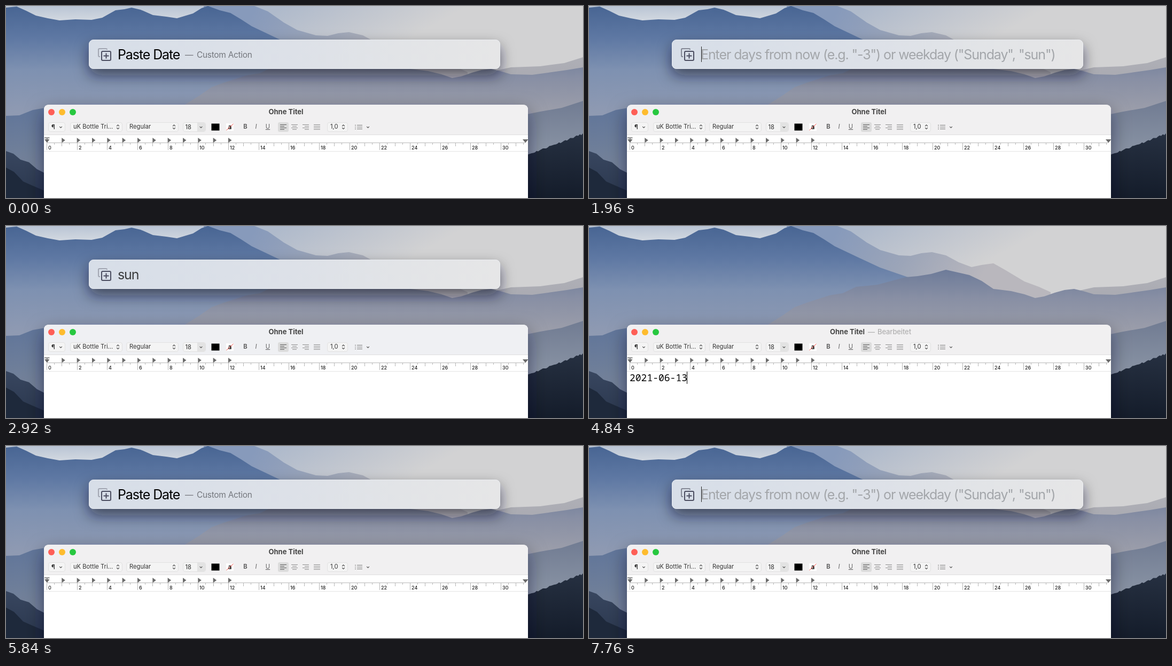
These frames come from a looping animation (1080 by 360 pixels, 8000 ms). An HTML page:

```html
<!DOCTYPE html>
<html lang="de">
<head>
<meta charset="utf-8">
<title>Paste Date</title>
<style>
  html, body { margin: 0; width: 100%; height: 100%; overflow: hidden; background: #8d99b3; }
  svg { display: block; width: 100%; height: 100%; }
  text { font-family: Inter, "Liberation Sans", sans-serif; font-optical-sizing: none; white-space: pre; }
  .big { font-size: 25px; font-weight: 400; letter-spacing: -.044em; }
  .sub { font-size: 15.5px; letter-spacing: -.02em; fill: #74777d; }
  .title { font-size: 13px; font-weight: 700; fill: #434343; }
  .soft { font-size: 13px; font-weight: 500; fill: #b0b0b0; letter-spacing: -.01em; }
  .tool { font-size: 11.2px; fill: #333; }
  .mark { font-size: 11.2px; fill: #606060; text-anchor: middle; }
  .num { font-size: 9px; font-weight: 500; fill: #222; }
  .mono { font: 500 18px "Noto Sans Mono", "DejaVu Sans Mono", monospace; }
  .box { fill: #f4f4f4; stroke: #e1e1e1; }
  .chev { fill: none; stroke: #555; stroke-width: 1.2; stroke-linecap: round; stroke-linejoin: round; }
  .key { fill: none; stroke: #fff; stroke-width: 5; stroke-linecap: round; stroke-linejoin: round; }
</style>
</head>
<body>
<svg viewBox="0 0 1080 360" preserveAspectRatio="none">
  <defs>
    <linearGradient id="sky" gradientUnits="userSpaceOnUse" x1="560" y1="-20" x2="640" y2="125">
      <stop offset="0" stop-color="#afbacb"/><stop offset=".5" stop-color="#c1c6cf"/><stop offset="1" stop-color="#d2d2d3"/>
    </linearGradient>
    <linearGradient id="glow" gradientUnits="userSpaceOnUse" x1="0" y1="0" x2="0" y2="28">
      <stop offset="0" stop-color="#b9c4d4"/><stop offset="1" stop-color="#d3d9e1"/>
    </linearGradient>
    <linearGradient id="far" gradientUnits="userSpaceOnUse" x1="470" y1="0" x2="700" y2="150">
      <stop offset="0" stop-color="#879abb"/><stop offset=".5" stop-color="#9ca5b8"/><stop offset="1" stop-color="#b9b7bd"/>
    </linearGradient>
    <linearGradient id="haze" gradientUnits="userSpaceOnUse" x1="0" y1="90" x2="0" y2="180">
      <stop offset="0" stop-color="#afb0b7"/><stop offset="1" stop-color="#a5a5ad"/>
    </linearGradient>
    <linearGradient id="main" gradientUnits="userSpaceOnUse" x1="0" y1="0" x2="0" y2="200">
      <stop offset="0" stop-color="#486593"/><stop offset=".3" stop-color="#5e78a3"/><stop offset=".6" stop-color="#7e91b1"/><stop offset="1" stop-color="#8f9ab2"/>
    </linearGradient>
    <linearGradient id="mid" gradientUnits="userSpaceOnUse" x1="0" y1="82" x2="0" y2="215">
      <stop offset="0" stop-color="#6d7b99"/><stop offset=".4" stop-color="#888fa4"/><stop offset="1" stop-color="#a1a2ac"/>
    </linearGradient>
    <linearGradient id="left" gradientUnits="userSpaceOnUse" x1="0" y1="190" x2="0" y2="300">
      <stop offset="0" stop-color="#60759a"/><stop offset="1" stop-color="#748299"/>
    </linearGradient>
    <linearGradient id="right" gradientUnits="userSpaceOnUse" x1="0" y1="175" x2="0" y2="270">
      <stop offset="0" stop-color="#707b92"/><stop offset="1" stop-color="#8892a3"/>
    </linearGradient>
    <linearGradient id="slope" gradientUnits="userSpaceOnUse" x1="0" y1="272" x2="0" y2="345">
      <stop offset="0" stop-color="#38465f"/><stop offset="1" stop-color="#2d3a51"/>
    </linearGradient>
    <linearGradient id="wood" gradientUnits="userSpaceOnUse" x1="0" y1="240" x2="0" y2="360">
      <stop offset="0" stop-color="#263041"/><stop offset="1" stop-color="#141c2a"/>
    </linearGradient>
    <linearGradient id="glass">
      <stop offset="0" stop-color="#d7dee8"/><stop offset=".5" stop-color="#dde1e8"/><stop offset=".75" stop-color="#e2e4e7"/><stop offset="1" stop-color="#e6e6e7"/>
    </linearGradient>
    <filter id="barShade" filterUnits="userSpaceOnUse" x="60" y="0" width="960" height="230">
      <feDropShadow dx="0" dy="12" stdDeviation="13" flood-color="#10162a" flood-opacity=".58"/>
    </filter>
    <filter id="winShade" filterUnits="userSpaceOnUse" x="0" y="100" width="1080" height="420">
      <feDropShadow dx="0" dy="13" stdDeviation="17" flood-color="#10162a" flood-opacity=".5"/>
    </filter>
    <filter id="keyShade" filterUnits="userSpaceOnUse" x="340" y="110" width="400" height="90">
      <feDropShadow dx="2" dy="3" stdDeviation="1.5" flood-color="#1c2238" flood-opacity=".55"/>
    </filter>
  </defs>

  <!-- landscape -->
  <rect width="1080" height="360" fill="url(#sky)"/>
  <rect width="376" height="40" fill="url(#glow)"/>
  <path fill="url(#far)" d="M370 0H465L490 10 520 31 545 45 580 55 602 56 622 51 642 49 668 55 692 68 716 77 735 73 757 70 780 83 815 104 842 114 864 124 864 200H370Z"/>
  <path fill="url(#haze)" d="M840 140L880 124 918 121 945 115 1000 113 1045 107 1080 96V220H840Z"/>
  <path fill="url(#main)" d="M0 3L20 1 38 9 56 18 78 23 100 27 130 25 160 26 180 22 205 8 222 6 235 3 252 7 275 17 300 20 320 23 350 14 366 4 378 0 400 8 420 13 440 25 460 38 500 57 545 78 600 97 640 130V360H0Z"/>
  <path fill="url(#mid)" d="M330 188L362 168 385 152 410 143 450 130 475 126 500 114 522 112 540 110 570 102 592 96 615 94 640 90 668 82 690 87 712 92 735 103 757 118 790 122 815 128 835 135 852 132 872 125 890 120 908 118 925 122 945 128 985 129 1015 125 1050 120 1080 115V360H330Z"/>
  <path fill="url(#left)" d="M0 206L25 205 50 195 90 188V360H0Z"/>
  <path fill="url(#slope)" d="M0 272L14 277 27 288 43 293 58 306 90 322V360H0Z"/>
  <path fill="#1e293b" d="M0 303L15 311 32 329 50 337 90 354V360H0Z"/>
  <path fill="url(#right)" d="M960 206L1000 198 1040 191 1080 178V360H960Z"/>
  <path id="trees" fill="url(#wood)"/>

  <!-- editor window -->
  <path filter="url(#winShade)" fill="#fff" d="M71 400V195Q71 185 81 185H967Q977 185 977 195V400Z"/>
  <path fill="#f1f0f1" d="M71 242V195Q71 185 81 185H967Q977 185 977 195V242Z"/>
  <path id="tint" fill="#eff0f3" d="M71 242V195Q71 185 81 185H967Q977 185 977 195V242Z"/>
  <path d="M71 241.5H977" stroke="#dedede"/>
  <path d="M71 272.5H977" stroke="#e4e4e4"/>
  <circle cx="85" cy="199" r="6" fill="#fe5f57"/>
  <circle cx="105" cy="199" r="6" fill="#febc2e"/>
  <circle cx="125" cy="199" r="6" fill="#28c840"/>
  <text id="plain" class="title" x="524" y="203" text-anchor="middle">Ohne Titel</text>
  <g id="edited">
    <text class="title" x="451" y="203">Ohne Titel</text>
    <text class="soft" x="522" y="203">—</text>
    <text class="soft" x="540" y="203">Bearbeitet</text>
    <text class="mono" x="76" y="291">2021-06-13</text>
    <path d="M183.5 273V296" stroke="#000"/>
  </g>
  <g id="tools"></g>
  <g id="ruler"></g>

  <!-- launcher bar -->
  <g id="bar">
    <rect x="155" y="63" width="770" height="55" rx="9" fill="url(#glass)" filter="url(#barShade)"/>
    <rect x="155.5" y="63.5" width="769" height="54" rx="8.5" fill="none" stroke="#eef1f5" stroke-opacity=".7"/>
    <g fill="none" stroke="#4b4d60" stroke-width="2">
      <path stroke="#a2a6b2" d="M176 95H175Q173 95 173 93V82Q173 80 175 80H187Q189 80 189 82"/>
      <rect x="179" y="85" width="17" height="17" rx="2"/>
      <path d="M182.5 93.5H192.5M187.5 88.5V98.5"/>
    </g>
  </g>
  <g id="action">
    <text class="big" x="209" y="100">Paste Date</text>
    <text class="sub" x="335" y="97">—</text>
    <text class="sub" x="357" y="97">Custom Action</text>
  </g>
  <g id="ask">
    <path fill="none" stroke="#858996" stroke-width="2" d="M176 95H175Q173 95 173 93V82Q173 80 175 80H187Q189 80 189 82"/>
    <text class="big" x="209" y="100" fill="#a3a6aa">Enter days from now (e.g. "-3") or weekday ("Sunday", "sun")</text>
    <path d="M210.5 76V105" stroke="#222"/>
  </g>
  <text id="typed" class="big" x="209" y="100" fill="#3a3b3d">sun</text>
  <g id="space" filter="url(#keyShade)">
    <path class="key" d="M367 131V170Q367 176 373 176H705Q711 176 711 170V131"/>
  </g>
  <g id="enter" filter="url(#keyShade)">
    <path class="key" d="M543 130H555Q560.5 130 560.5 135.5V147Q560.5 152.5 555 152.5H521M533 140L520 152.5 533 164.5"/>
  </g>
</svg>
<script>
const LOOP = 8000;
const STEPS = [
  [0, 'bar plain action'],
  [1000, 'bar plain action space'],
  [1960, 'bar plain ask'],
  [2920, 'bar plain tint typed'],
  [3880, 'bar plain tint typed enter'],
  [4840, 'edited'],
  [5840, 'bar plain action'],
  [6800, 'bar plain action space'],
  [7760, 'bar plain ask']
];
const $ = id => document.getElementById(id);

// drawing helpers
const text = (cls, x, y, s, more = '') => `<text class="${cls}" x="${x}" y="${y}" ${more}>${s}</text>`;
const box = (x, w) => `<rect class="box" x="${x + .5}" y="218.5" width="${w - 1}" height="17" rx="3.5"/>`;
const line = (d, color) => `<path d="${d}" stroke="${color}" fill="none"/>`;
const down = x => `<path class="chev" d="M${x - 2} 226.3l2 2 2-2"/>`;
const upDown = x => `<path class="chev" d="M${x - 2} 225l2-2.2 2 2.2m-4 3.5l2 2.2 2-2.2"/>`;

function align(x, widths, pull, color) {
  return widths.map((w, i) => line(`M${x + (12 - w) * pull} ${222.5 + i * 3}h${w}`, color)).join('');
}

function drawTools() {
  const short = [12, 8, 12, 8], full = [12, 12, 12, 12];
  $('tools').innerHTML = [
    box(79, 32), text('tool', 85, 231, '¶', 'font-weight="700"'), down(102.5),
    box(120, 98), text('tool', 126, 230, 'uK Bottle Tri...'), upDown(209.5),
    box(225, 98), text('tool', 231, 230, 'Regular'), upDown(314.5),
    box(331, 43), '<path d="M358 219h12q3 0 3 3v10q0 3-3 3h-12z" fill="#e3e3e3"/>',
    text('tool', 335.5, 231, '18'), down(365),
    '<rect x="384.5" y="220.5" width="15" height="13" fill="#000"/>',
    '<rect x="412" y="220" width="14" height="14" rx="1" fill="#fff"/>',
    text('tool', 419, 231, 'a', 'text-anchor="middle" font-weight="700" style="fill:#000"'),
    line('M412.5 233L425.5 221', '#f0433a'),
    text('mark', 448, 230, 'B', 'font-weight="700"'),
    text('mark', 468, 230, 'I', 'font-style="italic"'),
    text('mark', 490, 230, 'U', 'text-decoration="underline"'),
    '<rect x="509" y="218" width="20" height="18" rx="3" fill="#dcdcdc"/>',
    align(513, short, 0, '#5c5c5c'), align(534, short, .5, '#8e8e8e'),
    align(555, short, 1, '#8e8e8e'), align(576, full, 0, '#8e8e8e'),
    box(601, 39), text('tool', 607, 230, '1,0'), upDown(631.5),
    [223.5, 227, 230.5].map(y => line(`M653 ${y}h2m2 0h10`, '#777')).join(''), down(677.5)
  ].join('');
}

function drawRuler() {
  const cm = 28.33, out = [line('M77 256.5H972', '#b9b9b9')];
  for (let i = 0; i <= 63; i++) {
    const x = Math.round(77 + i * cm / 2) - .5;
    const size = i % 4 === 0 ? 13 : i % 2 === 0 ? 6 : 3;
    out.push(line(`M${x} 257v${size}`, '#b4b4b4'));
    if (i % 4 === 0) out.push(text('num', x + 2.5, 269, i / 2));
  }
  for (let i = 1; i <= 12; i++) {
    out.push(`<path d="M${76 + i * cm} 247v9.5l6.5-4.75z" fill="#6c6c6c"/>`);
  }
  out.push('<path d="M72 246.5h9.5v1.5h-4v2h4l-4.75 6.5-4.75-6.5h4v-2h-4zM967 250h10.5l-5.25 6.5z" fill="#6c6c6c"/>');
  $('ruler').innerHTML = out.join('');
}

// wooded slope with a seeded, ragged crest
function drawTrees() {
  let seed = 11, d = 'M960 360V284';
  const rnd = () => (seed = seed * 16807 % 2147483647) / 2147483647;
  for (let x = 960; x <= 1080; x += 3) {
    const u = (x - 977) / 103;
    d += `L${x} ${(280 - 39 * u - rnd() * 3).toFixed(1)}`;
  }
  $('trees').setAttribute('d', d + 'V360Z');
}

function play() {
  const ids = new Set(STEPS.flatMap(([, parts]) => parts.split(' ')));
  for (const id of ids) {
    const frames = STEPS.map(([at, parts]) => ({
      offset: at / LOOP,
      opacity: parts.split(' ').includes(id) ? 1 : 0,
      easing: 'step-end'
    }));
    frames.push({ ...frames[frames.length - 1], offset: 1 });
    $(id).animate(frames, { duration: LOOP, iterations: Infinity });
  }
}

drawTools();
drawRuler();
drawTrees();
play();
</script>
</body>
</html>
```
